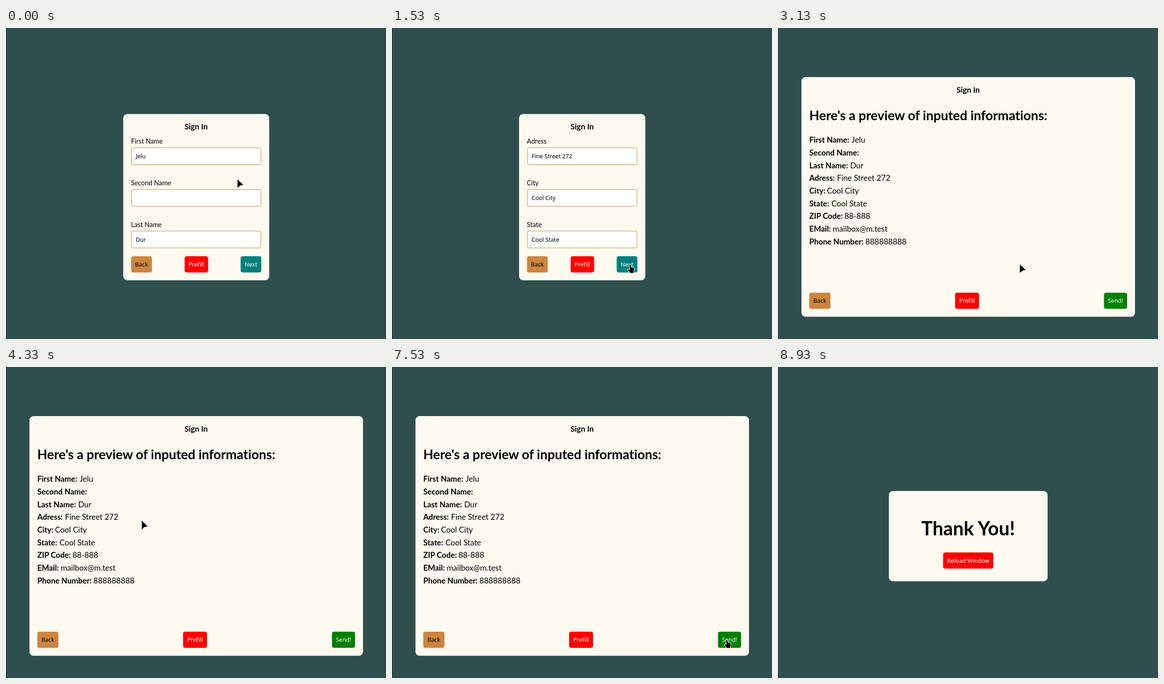
Write an HTML page that moves like this. It is 826 by 678 pixels and loops after 8.99 s.

```html
<!DOCTYPE html>
<html lang="en">
<head>
<meta charset="utf-8">
<title>Sign In</title>
<style>
  html, body { margin: 0; width: 100%; height: 100%; overflow: hidden; background: #2f4f4f; }
  svg { display: block; width: 826px; height: 678px; }
  text { font-family: Lato, sans-serif; font-variant-ligatures: none; fill: #000; white-space: pre; }
  .bold { font-weight: 700; }
  .ui { font-family: "Noto Sans", "Open Sans", sans-serif; }
  .light { fill: #fffaf0; }
  .middle { text-anchor: middle; }
  .cursor { fill: #000; stroke: #fff; stroke-width: 2.2; stroke-linejoin: round; paint-order: stroke; }
</style>
</head>
<body>
<svg id="stage" viewBox="0 0 826 678"></svg>
<script>
const LOOP = 8990;
const STEP = 1000 / 15;
const CENTER = 413.3;

const box = (x, y, right, bottom, radius, fill, extra = '') =>
  `<rect x="${x}" y="${y}" width="${right - x}" height="${bottom - y}" rx="${radius}" fill="${fill}" ${extra}/>`;

const text = (x, y, size, content, cls = '') =>
  `<text x="${x}" y="${y}" font-size="${size}" class="${cls}">${content}</text>`;

const card = (x, y, right, bottom) => box(x, y, right, bottom, 9, '#fffaf0');

const title = y => text(CENTER, y, 17, 'Sign In', 'bold middle');

function button(x, right, y, fill, label, dark) {
  return box(x, y, right, y + 35.3, 4.3, fill) +
    text((x + right) / 2, y + 22.4, 12.65, label, `ui middle ${dark ? '' : 'light'}`);
}

function field(left, right, row, label, value) {
  const y = 260.2 + row * 90.7;
  return text(left - 0.3, y - 8, 14.4, label) +
    box(left + 1, y + 1, right - 1, y + 37.8, 3.6, '#fff', 'stroke="#deb887" stroke-width="1.8"') +
    text(left + 10, y + 24, 12.65, value, 'ui');
}

function form({ left, right, prefill, next, nextLabel, fields }) {
  return card(left - 17.2, 187.5, right + 17.2, 550) + title(221) +
    fields.map(([label, value], row) => field(left, right, row, label, value)).join('') +
    button(left, left + 45.2, 497.6, '#cd853f', 'Back', true) +
    button(prefill, prefill + 51, 497.6, '#f00', 'Prefill') +
    button(next, right, 497.6, '#008080', nextLabel);
}

// label, value, left edge of the value
const summary = [
  ['First Name:', 'Jelu', 160],
  ['Second Name:', '', 180],
  ['Last Name:', 'Dur', 157],
  ['Adress:', 'Fine Street 272', 128.3],
  ['City:', 'Cool City', 106.4],
  ['State:', 'Cool State', 116.2],
  ['ZIP Code:', '88-888', 144.4],
  ['EMail:', 'mailbox@m.test', 119],
  ['Phone Number:', '888888888', 190],
];

const preview = card(51, 107, 776, 629.6) + title(141) +
  text(68, 200.5, 28.3, "Here's a preview of inputed informations:", 'bold') +
  summary.map(([label, value, x], row) => {
    const y = 250.4 + row * 27.65;
    return text(68, y, 16.9, label, 'bold') + text(x, y, 17.1, value);
  }).join('') +
  button(68, 114, 577, '#cd853f', 'Back', true) +
  button(385, 437, 577, '#f00', 'Prefill') +
  button(708.6, 758.8, 577, '#008000', 'Send!');

const thanks = card(241, 270.2, 586, 467.2) +
  text(CENTER, 367, 41.4, 'Thank You!', 'bold middle') +
  button(359, 468, 404.2, '#f00', 'Reload Window');

const screens = [
  [0, form({
    left: 272, right: 555, prefill: 388.3, next: 510, nextLabel: 'Next',
    fields: [['First Name', 'Jelu'], ['Second Name', ''], ['Last Name', 'Dur']],
  })],
  [1000, form({
    left: 293.4, right: 533.4, prefill: 388.3, next: 488.4, nextLabel: 'Next',
    fields: [['Adress', 'Fine Street 272'], ['City', 'Cool City'], ['State', 'Cool State']],
  })],
  [2000, form({
    left: 267.5, right: 559.3, prefill: 379, next: 495.3, nextLabel: 'Preview',
    fields: [['ZIP Adress', '88-888'], ['Email', 'mailbox@m.test'], ['Phone Number', '888888888']],
  })],
  [3130, preview],
  [7670, thanks],
];

const ARROW = 'M.2 -.2 V18.4 L5.6 13.8 L12.6 11.8 Z';
const HAND = 'M-1.5 1.5 Q-.2 -.8 1.2 1.3 L2.6 6.6 L7 7.2 Q8.8 7.6 8.8 9.6 L8.3 14 L7.2 18.6 ' +
  'H.2 L-.8 16.4 L-4 12.4 Q-4.5 10.2 -2.4 10.6 L-.3 11.8 Z';

// time, x, y, pointer shape from that time on
const path = [
  [0, 503, 330, ARROW], [333, 556, 354, ARROW], [600, 601, 425, ARROW],
  [800, 580, 486, ARROW], [867, 555, 500, HAND], [933, 542, 507, HAND],
  [1000, 542, 507, ARROW], [1200, 542, 507, ARROW], [1333, 532, 511, HAND],
  [1533, 517.5, 515.5, HAND], [2400, 517.5, 515.5, HAND], [2600, 526.5, 515.8, HAND],
  [3000, 525.5, 515.5, ARROW], [3667, 525.5, 515.5, ARROW], [3733, 509, 493, ARROW],
  [3800, 509, 493, ARROW], [3933, 291, 326, ARROW], [4067, 291, 326, ARROW],
  [4333, 295, 335.5, ARROW], [4400, 295, 335.5, ARROW], [5000, 566, 512, ARROW],
  [5200, 566, 512, ARROW], [5267, 573, 516, ARROW], [6667, 573, 516, ARROW],
  [7400, 715, 586, HAND], [7533, 727.5, 594, HAND], [7667, 727.5, 594, ARROW],
  [8533, 107, 39, ARROW], [8867, 80, 2, ARROW], [8933, 60, -60, ARROW], [9000, 60, -60, ARROW],
];

const stage = document.getElementById('stage');
stage.innerHTML = box(0, 0, 826, 678, 0, '#2f4f4f') + box(0, 0, 1, 678, 0, '#20242e') +
  screens.map(([, content]) => `<g class="screen">${content}</g>`).join('') +
  '<path class="cursor"/>';
const groups = [...stage.querySelectorAll('.screen')];
const cursor = stage.querySelector('.cursor');

function draw(time) {
  const current = screens.findLastIndex(([start]) => time >= start);
  groups.forEach((group, i) => { group.style.display = i === current ? '' : 'none'; });

  const t = Math.floor((time + 4) / STEP) * STEP;
  const i = path.findLastIndex(([start]) => t + 1 >= start);
  const [t0, x0, y0, shape] = path[i];
  const [t1, x1, y1] = path[Math.min(i + 1, path.length - 1)];
  const k = Math.max(0, (t - t0) / (t1 - t0 || 1));
  cursor.setAttribute('d', shape);
  cursor.setAttribute('transform', `translate(${x0 + (x1 - x0) * k} ${y0 + (y1 - y0) * k})`);
}

const origin = performance.now();
function tick() {
  draw((performance.now() - origin) % LOOP);
  requestAnimationFrame(tick);
}
tick();
</script>
</body>
</html>
```
